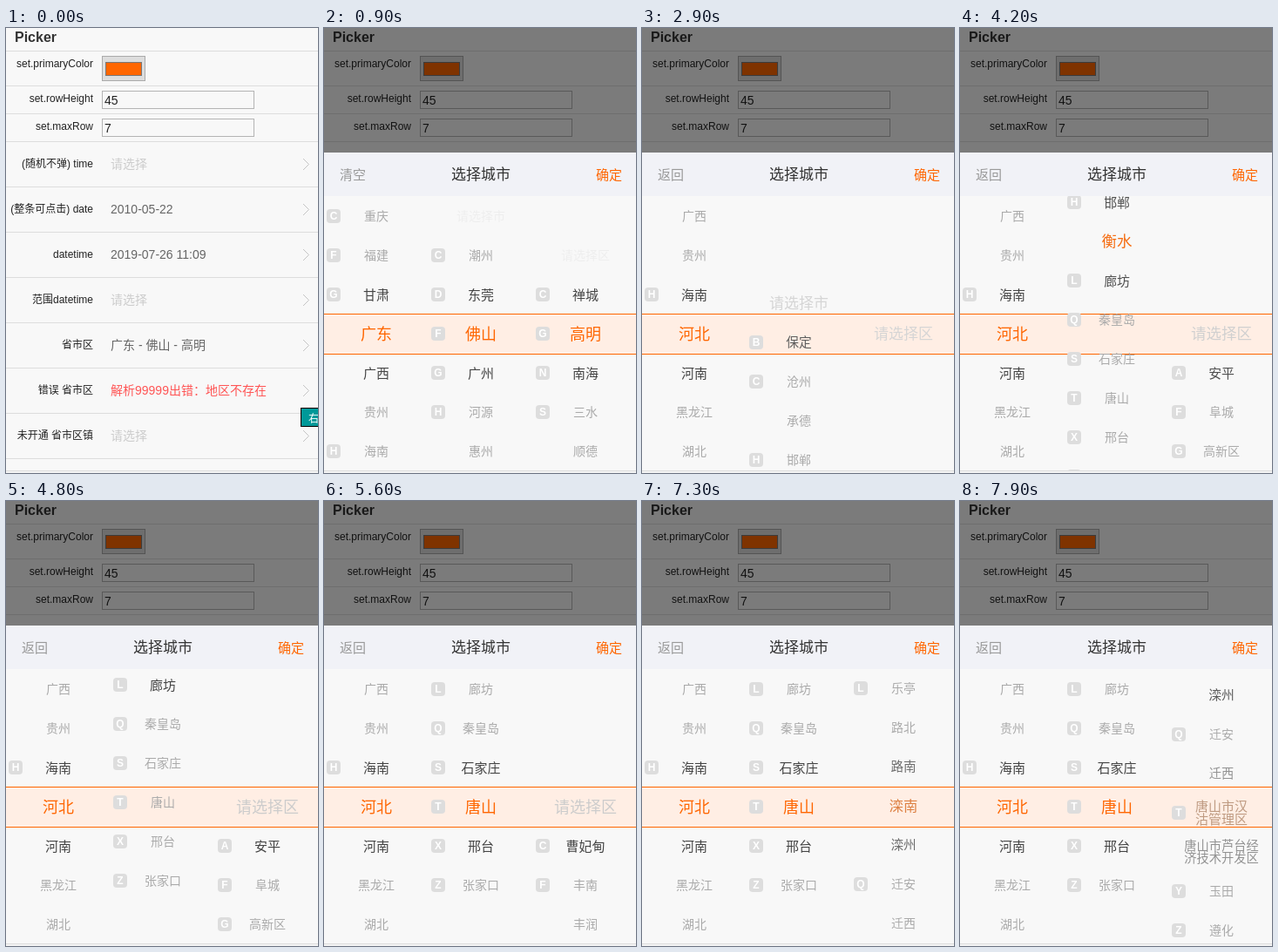
Recreate the animation shown at these times as an HTML page with a canvas. Size 358 by 511 pixels, loop 8000 ms.

```html
<!DOCTYPE html>
<html lang="zh-CN">
<head>
<meta charset="utf-8">
<title>Picker</title>
<style>
html, body { margin: 0; width: 100%; height: 100%; overflow: hidden; background: #f8f8f8; }
canvas { display: block; }
</style>
</head>
<body>
<canvas id="stage" width="358" height="511"></canvas>
<script>
const ctx = document.getElementById('stage').getContext('2d');
const LOOP = 8000, STEP = 100, OPEN = 900;
const ROW = 45, TOP = 193, BOTTOM = 508, MID = 351;
const ORANGE = '#f60', PAGE = '#f8f8f8';
const FONT = '"Liberation Sans", "Noto Sans CJK SC", "Noto Sans CJK", sans-serif';

// A leading capital is the index badge, "|" breaks a line.
const list = s => s.split(' ').map(w => {
  const [, badge, name] = w.match(/^([A-Z]?)(.*)$/);
  return { badge, lines: name.split('|'), hint: name.startsWith('请选择') };
});

const provinces = list('请选择省 A安徽 B北京 C重庆 F福建 G甘肃 广东 广西 贵州 H海南 河北 河南 黑龙江 湖北 湖南 J吉林');
const guangdong = list('请选择市 C潮州 D东莞 F佛山 G广州 H河源 惠州 J江门');
const hebei = list('请选择市 B保定 C沧州 承德 H邯郸 衡水 L廊坊 Q秦皇岛 S石家庄 T唐山 X邢台 Z张家口');
const foshan = list('请选择区 C禅城 G高明 N南海 S三水 顺德');
const noDistrict = list('请选择区');
const hengshui = list('请选择区 A安平 F阜城 G高新区 故城');
const tangshan = list('请选择区 C曹妃甸 F丰南 丰润 G古冶 H河北唐山|海港经济|开发区 K开平 L乐亭 路北 路南 滦南 滦州 ' +
  'Q迁安 迁西 T唐山市汉|沽管理区 唐山市芦台经|济技术开发区 Y玉田 Z遵化');

// scroll: [time, row, ease-out power]; picks: [time, row, items, fade duration]
const columns = [
  {
    x: 60,
    scroll: [[1600, 6], [2500, 10, 2.4]],
    picks: [[0, 6, provinces, 1], [2550, 10, provinces, 250]]
  },
  {
    x: 180,
    scroll: [[2550, 3], [3100, 0, 1.34], [3350, 0], [3850, 5, 2], [4050, 5], [4900, 9.11, 4.4], [5050, 9.11], [5300, 9, 2]],
    picks: [[0, 3, guangdong, 1], [2600, 0, hebei, 400], [3980, 5, hebei, 250], [5300, 9, hebei, 250]]
  },
  {
    x: 300,
    scroll: [[2550, 2], [2600, 0, 1], [5700, 0], [6000, 3, 2], [6350, 3], [7150, 10.05, 2.33], [7200, 10.05], [7400, 10, 2],
      [7550, 10], [7900, 13.84, 2], [8000, 14, 2]],
    picks: [[0, 2, foshan, 1], [2600, 0, noDistrict, 400], [3980, 0, hengshui, 250], [5300, 0, tangshan, 250],
      [5900, 3, tangshan, 200], [7150, 10, tangshan, 250], [7840, 14, tangshan, 250]]
  }
];

const mix = (a, b, k) => a + (b - a) * k;

function rect(x, y, w, h, fill) {
  ctx.fillStyle = fill;
  ctx.fillRect(x, y, w, h);
}

function box(x, y, w, h, fill, border) {
  rect(x, y, w, h, border);
  rect(x + 1, y + 1, w - 2, h - 2, fill);
}

function text(s, x, cy, size, color, align = 'left', weight = 400) {
  ctx.font = `${weight} ${size}px ${FONT}`;
  ctx.textAlign = align;
  ctx.fillStyle = color;
  ctx.fillText(s, x, Math.round(cy + size * 0.37));
}

function drawForm() {
  rect(0, 0, 358, 511, PAGE);
  text('Picker', 10, 10, 16, '#333', 'left', 700);
  for (const y of [26, 66, 98, 130, 182, 234, 286, 338, 390, 442, 494]) rect(0, y, 358, 1, '#ddd');

  text('set.primaryColor', 100, 41, 12, '#222', 'right');
  box(110, 32, 50, 29, '#ddd', '#aaa');
  box(114, 39, 42, 16, ORANGE, '#777');
  [['set.rowHeight', 72, '45'], ['set.maxRow', 104, '7']].forEach(([label, y, value]) => {
    text(label, 100, y + 8.5, 12, '#222', 'right');
    box(110, y, 175, 21, PAGE, '#b4b4b4');
    text(value, 113, y + 11, 14, '#222');
  });

  const hint = '#ccc', plain = '#666';
  [
    ['(随机不弹) time', '请选择', hint],
    ['(整条可点击) date', '2010-05-22', plain],
    ['datetime', '2019-07-26 11:09', plain],
    ['范围datetime', '请选择', hint],
    ['省市区', '广东 - 佛山 - 高明', plain],
    ['错误 省市区', '解析99999出错：地区不存在', '#f55'],
    ['未开通 省市区镇', '请选择', hint]
  ].forEach(([label, value, color], i) => {
    const y = 156 + i * 52;
    text(label, 100, y, 12, '#222', 'right');
    text(value, 120, y, 14, color);
    ctx.strokeStyle = '#c4c4c4';
    ctx.lineWidth = 1;
    ctx.beginPath();
    ctx.moveTo(341, y - 6);
    ctx.lineTo(347.5, y + 0.5);
    ctx.lineTo(341, y + 7);
    ctx.stroke();
  });

  box(338, 436, 30, 22, '#099', '#000');
  text('右', 347, 449, 12, '#fff');
}

function scrollAt(keys, t) {
  let [t0, v0] = keys[0];
  for (const [t1, v1, power = 1] of keys) {
    if (t < t1) return t <= t0 ? v0 : mix(v0, v1, 1 - (1 - (t - t0) / (t1 - t0)) ** power);
    [t0, v0] = [t1, v1];
  }
  return v0;
}

// Size and colour of a row by its distance from the picked one.
function rowStyle(item, distance) {
  const size = [18, 15][distance] || 14;
  if (item.hint) return [size, ...Array(3).fill(distance ? 238 : 204)];
  return [size, ...([[255, 102, 0], [68, 68, 68]][distance] || [170, 170, 170])];
}

function drawBadge(letter, x, y) {
  ctx.fillStyle = '#ddd';
  ctx.beginPath();
  ctx.roundRect(x - 8, y - 8, 16, 16, 4);
  ctx.fill();
  text(letter, x, y, 12, '#fff', 'center', 700);
}

function drawColumn({ x, scroll, picks }, t) {
  const now = picks.findLastIndex(p => p[0] <= t);
  const [start, picked, items, fade] = picks[now];
  const before = picks[now - 1];
  const old = before && before[2] === items ? before[1] : -9;
  const k = Math.min(1, (t - start) / fade);
  const pos = scrollAt(scroll, t);

  items.forEach((item, i) => {
    const y = Math.round(MID + (i - pos) * ROW);
    if (y < TOP - 30 || y > BOTTOM + 30) return;
    const from = rowStyle(item, Math.abs(i - old));
    const to = rowStyle(item, Math.abs(i - picked));
    const [size, ...rgb] = now ? from.map((v, j) => mix(v, to[j], k)) : to;
    if (item.badge) drawBadge(item.badge, x - 49, y);
    item.lines.forEach((line, n) =>
      text(line, x, y + (n - (item.lines.length - 1) / 2) * size, size, `rgb(${rgb.map(Math.round)})`, 'center'));
  });
}

function drawPicker(t) {
  rect(0, 0, 358, 143, 'rgba(0,0,0,.5)');
  rect(0, 143, 358, 50, '#f1f2f7');
  text(t < 2600 ? '清空' : '返回', 18, 168, 15, '#999');
  text('选择城市', 180, 168, 17, '#333', 'center');
  text('确定', 342, 168, 15, ORANGE, 'right');

  rect(0, TOP, 358, BOTTOM - TOP, PAGE);
  rect(0, 328, 358, 47, '#ffeee4');
  rect(0, 328, 358, 1, ORANGE);
  rect(0, 374, 358, 1, ORANGE);

  ctx.save();
  ctx.beginPath();
  ctx.rect(0, TOP, 358, BOTTOM - TOP);
  ctx.clip();
  columns.forEach(c => drawColumn(c, t));
  ctx.restore();
}

function frame() {
  const t = Math.floor(performance.now() % LOOP / STEP) * STEP;
  drawForm();
  if (t >= OPEN) drawPicker(t);
  rect(0, 508, 358, 3, '#f3f3f3');
  rect(0, 508, 358, 1, '#ddd');
  requestAnimationFrame(frame);
}
frame();
</script>
</body>
</html>
```
